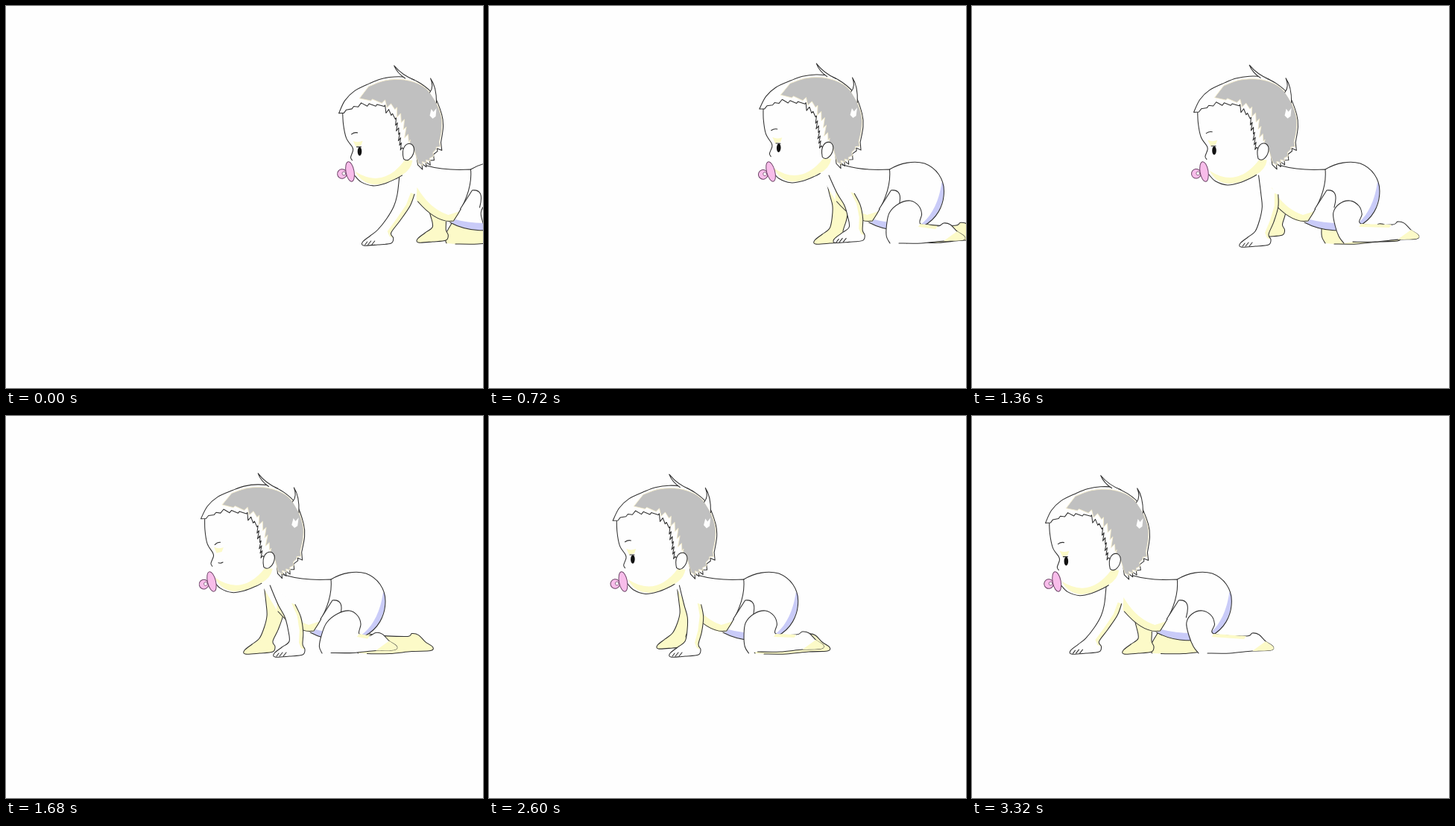
Recreate the animation shown at these times as an HTML page. Size 640 px wide and 512 px high, loop 3360 ms.

```html
<!DOCTYPE html>
<html lang="en">
<head>
<meta charset="utf-8">
<title>Crawling baby</title>
<style>
  html, body { margin: 0; width: 100%; height: 100%; overflow: hidden; background: #fefefe; }
  svg { display: block; width: 640px; height: 512px; stroke-linejoin: round; stroke-linecap: round; }
  .ink, .line, .dark { stroke: #303030; stroke-width: 1.05; }
  .ink, .skin { fill: #fefefe; }
  .line { fill: none; }
  .dark, .shade { fill: #fcfac8; }
  .blue { fill: #c9cbf8; }
  .hair { fill: #c0c0c0; stroke: #f6edc8; stroke-width: .8; }
  .pink { fill: #f8bdea; stroke: #6d4568; stroke-width: 1; }
</style>
</head>
<body>
<svg viewBox="0 0 640 512">
  <g id="baby">
    <path id="farLeg" class="dark"/>
    <path id="farArm" class="dark"/>

    <!-- diaper -->
    <path class="skin" d="M177 219C230 190 270 240 240 282C226 302 180 306 149 290Z"/>
    <path class="blue" d="M250 240C251 266 240 286 222 295L212 297C230 288 243 266 247 236Z"/>
    <path class="blue" d="M149 290L156 286Q174 291 198 291L206 300Q178 304 149 290Z"/>
    <path class="line" d="M177 219C192 210 210 207 224 211C240 217 250 232 250 248C250 268 240 286 222 295C205 303 175 304 149 290"/>

    <!-- torso -->
    <path class="skin" d="M84 226L104 212Q142 221 177 219Q180 250 154 289Q132 292 104 260Z"/>
    <path class="shade" d="M105 243Q122 272 147 280L163 275L154 289Q132 293 104 260Z"/>
    <path class="line" d="M106 211L118 214Q142 221 177 219Q180 250 154 288Q132 292 106 262"/>
    <path class="ink" d="M163 272Q172 258 179 247Q196 245 189 270"/>

    <path id="leg" class="ink"/>
    <path id="legShade" class="shade"/>
    <path id="arm" class="skin"/>
    <path id="armShade" class="shade"/>
    <path id="armLine" class="line"/>
    <path id="fingers" class="line"/>

    <g id="head">
      <path id="face" class="skin"/>
      <path class="shade" d="M22 222Q60 246 89 206L99 207Q97 220 84 227Q40 254 22 222Z"/>
      <path id="profile" class="line"/>
      <path id="hair" class="ink"/>
      <path id="hairShade" class="hair"/>
      <path class="ink" d="M89 97Q78 90 74 80Q85 93 101 99"/>
      <path class="ink" d="M122 116Q128 108 123 97Q131 108 131 130"/>
      <path class="skin" d="M124 138L127 142L131 137L130 148L126 151L122 147Z"/>
      <path class="ink" d="M87 205C83 189 91 183 97 185C104 189 101 201 94 206Q90 208 87 205"/>
      <path class="shade" d="M19 181Q25 184 32 181L30 187L23 189Z"/>
      <path id="brow" class="line" d="M17 172Q21 169 25 170"/>
      <g id="open">
        <path class="line" d="M24 189L30 189"/>
        <ellipse id="eye" cx="28" cy="195" rx="2.8" ry="5.8" fill="#111"/>
      </g>
      <path id="shut" class="line" d="M26 202Q29 203 32 201"/>
    </g>

    <g id="pacifier">
      <circle class="pink" cx="-11" cy="1" r="6.3"/>
      <circle cx="-8.5" cy="1" r="2.4" fill="#fefefe" stroke="#6d4568" stroke-width=".7"/>
      <ellipse class="pink" rx="5.5" ry="13.5"/>
    </g>
  </g>
</svg>
<script>
const LOOP = 3360, CYCLE = 1120, STEP = 40, STRIDE = 117;
const $ = id => document.getElementById(id);
const setPath = (id, d) => $(id).setAttribute('d', d);
const move = (id, value) => $(id).setAttribute('transform', value);
const mix = (a, b, u) => a.map((v, k) => v + (b[k] - v) * u);
const shift = (p, dx, dy) => p.map(([x, y]) => [x + dx, y + dy]);
const noise = i => Math.abs(Math.sin(i * 12.9898) * 43758.5453) % 1;

// Smooth open curve through the points.
function curve(p) {
  let d = 'M' + p[0];
  for (let i = 0; i < p.length - 1; i++) {
    const a = p[i - 1] || p[i], b = p[i], c = p[i + 1], e = p[i + 2] || c;
    const h1 = b.map((v, k) => v + (c[k] - a[k]) / 6);
    const h2 = c.map((v, k) => v - (e[k] - b[k]) / 6);
    d += `C${h1} ${h2} ${c}`;
  }
  return d;
}

// Row of uneven pointed locks along a line.
function locks(p, count, dx, dy) {
  let d = '';
  for (let i = 0; i < p.length - 1; i++) {
    for (let j = 0; j < count; j++) {
      const [x, y] = mix(p[i], p[i + 1], j / count);
      const size = .4 + noise(i * count + j + 1);
      d += `L${x} ${y}L${x + dx * size} ${y + dy * size}`;
    }
  }
  return d + 'L' + p[p.length - 1];
}

const band = (p, dx, dy) => curve(p) + 'L' + shift(p, dx, dy).reverse().join(' ') + 'Z';

function drawFixed() {
  const brow = [[5, 138], [6, 158], [10, 177], [18, 189], [19, 194], [16, 203], [18, 207]];
  const chin = [[21, 227], [30, 236], [46, 241], [62, 238], [78, 231], [85, 227]];
  setPath('profile', curve(brow) + curve(chin));
  setPath('face', curve(brow) + 'L' + chin.join(' ') + 'L106 212L104 150L60 122Z');

  const crown = [[0, 144], [8, 127], [21, 114], [41, 104], [56, 98], [74, 95], [92, 96], [110, 104], [127, 119], [138, 145], [140, 162], [137, 183]];
  setPath('hair', curve(crown)
    + locks([[137, 183], [122, 207], [106, 213]], 3, 1, 8)
    + locks([[103, 190], [85, 190], [82, 170], [77, 150], [62, 133], [30, 130], [0, 144]], 3, -3, 4) + 'Z');

  const top = [[40, 108], [62, 100], [88, 99], [112, 107], [127, 123], [137, 146], [138, 165], [135, 182]];
  setPath('hairShade', curve(top)
    + locks([[135, 182], [122, 204], [107, 211]], 3, 1, 5)
    + locks([[99, 187], [93, 172], [88, 152], [78, 136], [62, 126], [28, 124]], 2, -5, 5) + 'Z');
}

// A limb tip rests on the ground, then swings one stride ahead.
function tip(t, start, duration, x0, ground, lift) {
  const n = Math.floor((t - start) / CYCLE);
  const u = Math.min(1, (t - start - n * CYCLE) / duration);
  const ease = u * u * (3 - 2 * u);
  return [x0 - STRIDE * (n + ease), ground - lift * Math.sin(Math.PI * u)];
}

// Arm outline from a fingertip: front edge, hand, back edge.
function armPoints([x, y]) {
  const shoulder = [85 + .2 * x, 236], wrist = [x + 29, y - 15];
  const side = (u, w) => {
    const [px, py] = mix(shoulder, wrist, u);
    return [px + 8 * Math.sin(Math.PI * u) + w, py];
  };
  const hand = [[20, -16], [10, -8], [0, 0], [1, 5], [20, 4], [38, 2], [41, -5], [38, -12]];
  return [
    [shoulder[0] - 10, 227], side(.25, -11), side(.5, -10.5), side(.75, -10),
    ...shift(hand, x, y),
    side(.8, 10), side(.5, 11), side(.25, 12)
  ];
}

// Leg outline from the toes: thigh follows the knee, hip stays put.
function legPoints([x, y]) {
  const knee = x - 100, q = knee - 169;
  const thigh = [[165, 309, .92], [167, 294, .7], [173, 277, .45], [187, 265, .28],
    [203, 261, .22], [214, 268, .25], [218, 279, .25], [216, 292, .28]];
  const foot = [[-36, -14], [-28, -18], [-19, -16], [-10, -7], [0, 0], [-3, 5], [-28, 6], [-58, 9], [-88, 9]];
  return [[knee, 318], ...thigh.map(([px, py, k]) => [px + k * q, py]), ...shift(foot, x, y)];
}

function drawLimbs(t, x) {
  const local = ([px, py]) => [px - x, py];
  const arm = armPoints(local(tip(t, 600, 560, 477, 318, 9)));
  const farArm = armPoints(local(tip(t, -40, 560, 554, 314, 9)));
  const leg = legPoints(local(tip(t, 0, 620, 755, 309, 2)));
  const farLeg = legPoints(local(tip(t, 520, 600, 691, 310, 2)));

  setPath('farLeg', curve(farLeg));
  setPath('farArm', curve(farArm));
  setPath('leg', curve(leg));
  setPath('legShade', band(leg.slice(8, 10), -3, 4) + curve(leg.slice(12, 16)) + 'Z');
  setPath('arm', curve(arm));
  setPath('armShade', band(arm.slice(-5), -5, -2));
  setPath('armLine', curve(arm));
  const [hx, hy] = arm[6];
  setPath('fingers', `M${hx + 6} ${hy}l-3 4m8 -5l-4 5m9 -5l-4 5`);
}

function drawHead(p) {
  const sway = (1 - Math.cos(2 * Math.PI * (p - .05))) / 2;
  move('head', `translate(0 ${-1.8 * sway}) rotate(${2.5 * sway} 108 200)`);
  const suck = Math.sin(2 * Math.PI * (p + .1));
  move('pacifier', `translate(${16 - 1.6 * suck} 222) rotate(${-12 + 3 * suck})`);

  const away = Math.abs(p % 1 - .5) * CYCLE;
  const shut = away < 60, half = away < 100;
  $('open').style.display = shut ? 'none' : '';
  $('shut').style.display = shut ? '' : 'none';
  $('eye').setAttribute('ry', half ? 3 : 5.8);
  move('brow', shut ? 'translate(3 5) rotate(-12 22 172)' : '');
}

function draw() {
  const t = Math.floor(performance.now() % LOOP / STEP) * STEP;
  const p = t / CYCLE;
  const x = 446.5 - STRIDE * p - 12 * Math.abs(Math.sin(Math.PI * p));
  move('baby', `translate(${x} 0)`);
  drawLimbs(t, x);
  drawHead(p);
  requestAnimationFrame(draw);
}

drawFixed();
draw();
</script>
</body>
</html>
```
